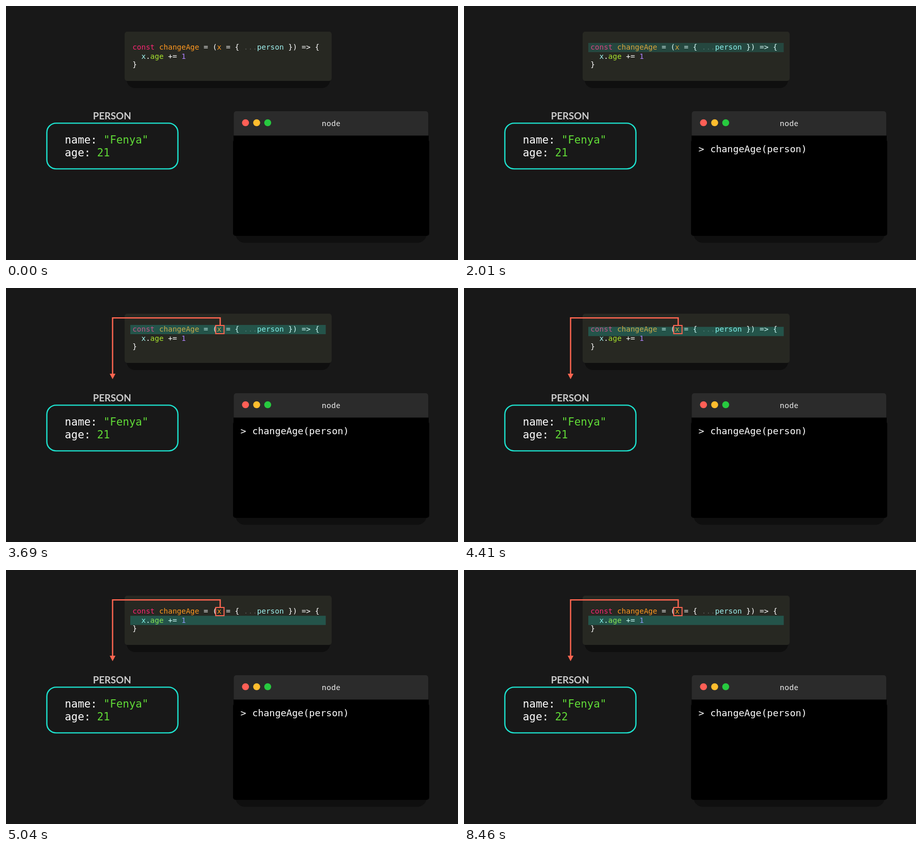
An HTML page for the animation above (8490 ms loop, 880 px wide and 495 px high).

```html
<!DOCTYPE html>
<html lang="en">
<head>
<meta charset="utf-8">
<title>Default parameter with a spread copy</title>
<style>
  html, body { margin: 0; width: 100%; height: 100%; overflow: hidden; background: #181818; }
  svg { display: block; width: 880px; height: 495px; }
  text { white-space: pre; fill: #fff; }
  .mono { font-family: "DejaVu Sans Mono", monospace; }
  .code { font-size: 14.4px; }
  .term { font-size: 18.4px; }
  .object { font-size: 20.8px; }
  .label { font: 700 18.8px Lato, sans-serif; fill: #cbcbcb; text-anchor: middle; }
  .bar { font: 400 15px Lato, sans-serif; fill: #f2f2f2; letter-spacing: .8px; }
  .key { fill: #f92672; }
  .name { fill: #fd971f; }
  .dim { fill: #50524d; }
  .var { fill: #a1f3f0; }
  .prop { fill: #a6e22e; }
  .num { fill: #ae81ff; }
  .value { fill: #61db37; }
  .arrow { fill: none; stroke: #fc6550; stroke-width: 2.5; }
</style>
</head>
<body>
<svg viewBox="0 0 880 495">
  <!-- code panel -->
  <rect x="235" y="110" width="396" height="50" rx="16" fill="#0f0f0f"/>
  <rect x="231" y="50" width="403" height="96" rx="5" fill="#272822"/>
  <g class="mono code">
    <text x="246.2" y="85.4"><tspan class="key">const</tspan> <tspan class="name">changeAge</tspan> = (<tspan class="name">x</tspan> = { <tspan class="dim">...</tspan><tspan class="var">person</tspan> }) =&gt; {</text>
    <text x="246.2" y="102.9">  <tspan class="var">x</tspan>.<tspan class="prop">age</tspan> += <tspan class="num">1</tspan></text>
    <text x="246.2" y="118.5">}</text>
  </g>
  <rect id="mark" x="242" y="72" width="380.5" height="18" fill="#1de4d0" fill-opacity=".23"/>

  <!-- person object -->
  <text class="label" x="206.5" y="220.8">PERSON</text>
  <rect x="79.5" y="228.4" width="255.2" height="89" rx="18" fill="none" stroke="#1de4d0" stroke-width="2.4"/>
  <g class="mono object">
    <text x="114.6" y="267.8">name: <tspan class="value">"Fenya"</tspan></text>
    <text x="114.6" y="292.5">age:</text>
    <text id="before" class="value" x="177.2" y="292.5">21</text>
    <text id="after" class="value" x="177.2" y="293">22</text>
  </g>

  <!-- terminal -->
  <rect x="447" y="400" width="372" height="61.5" rx="18" fill="#0f0f0f"/>
  <path d="M443.5 253V210a5 5 0 0 1 5-5H817a5 5 0 0 1 5 5V253Z" fill="#2b2b2b"/>
  <rect x="443" y="252.5" width="380" height="30"/>
  <rect x="442" y="260" width="382" height="188" rx="5"/>
  <circle cx="466.3" cy="227.5" r="6.8" fill="#ff5f56"/>
  <circle cx="488" cy="227.5" r="6.8" fill="#ffbd2e"/>
  <circle cx="509.5" cy="227.5" r="6.8" fill="#27c93f"/>
  <text class="bar" x="615" y="234.4">node</text>
  <g class="mono term">
    <text id="prompt" x="456.5" y="285.2">&gt;</text>
    <text id="call" x="479.4" y="285.2"></text>
  </g>

  <!-- pointer from the parameter to the object -->
  <clipPath id="reached"><rect id="reach" x="190" y="160" width="40" height="0"/></clipPath>
  <rect id="frame" class="arrow" x="408.3" y="73" width="16.2" height="16" style="stroke-width:2"/>
  <path id="line" class="arrow" d="M417 72V58.2H207.5V168"/>
  <path d="M201.9 167H213.1L207.5 177.8Z" fill="#fc6550" clip-path="url(#reached)"/>
</svg>
<script>
  const LOOP = 8490;
  const CALL = 'changeAge(person)';
  const TYPE_START = 360, TYPE_STEP = 810 / 17;
  const TIP_END = 177.8;

  const el = id => document.getElementById(id);
  const span = (t, from, to) => Math.min(1, Math.max(0, (t - from) / (to - from)));
  const sine = p => (1 - Math.cos(Math.PI * p)) / 2;
  const quad = p => p < .5 ? 2 * p * p : 1 - 2 * (1 - p) ** 2;

  const line = el('line');
  const lineLength = line.getTotalLength();
  const fullLength = lineLength + TIP_END - 168;

  function render(t) {
    const typed = t < TYPE_START ? 0 : Math.floor((t - TYPE_START) / TYPE_STEP + .01) + 1;
    el('prompt').style.opacity = typed ? 1 : 0;
    el('call').textContent = CALL.slice(0, Math.max(0, typed - 1));

    const mark = el('mark');
    mark.style.opacity = span(t, 1740, 2130);
    mark.setAttribute('y', 72 + 17.2 * sine(span(t, 4140, 5025)));

    el('frame').style.opacity = span(t, 2610, 3000);
    const drawn = fullLength * quad(span(t, 3030, 3640));
    line.style.visibility = drawn > 0 ? 'visible' : 'hidden';
    line.style.strokeDasharray = `${Math.min(drawn, lineLength)} ${fullLength}`;
    el('reach').setAttribute('height', Math.max(0, TIP_END - fullLength + drawn - 160));

    const swap = span(t, 5490, 5940);
    el('before').style.opacity = 1 - swap;
    el('after').style.opacity = swap;
  }

  const start = performance.now();
  function tick() {
    render((performance.now() - start) % LOOP);
    requestAnimationFrame(tick);
  }
  tick();
</script>
</body>
</html>
```
